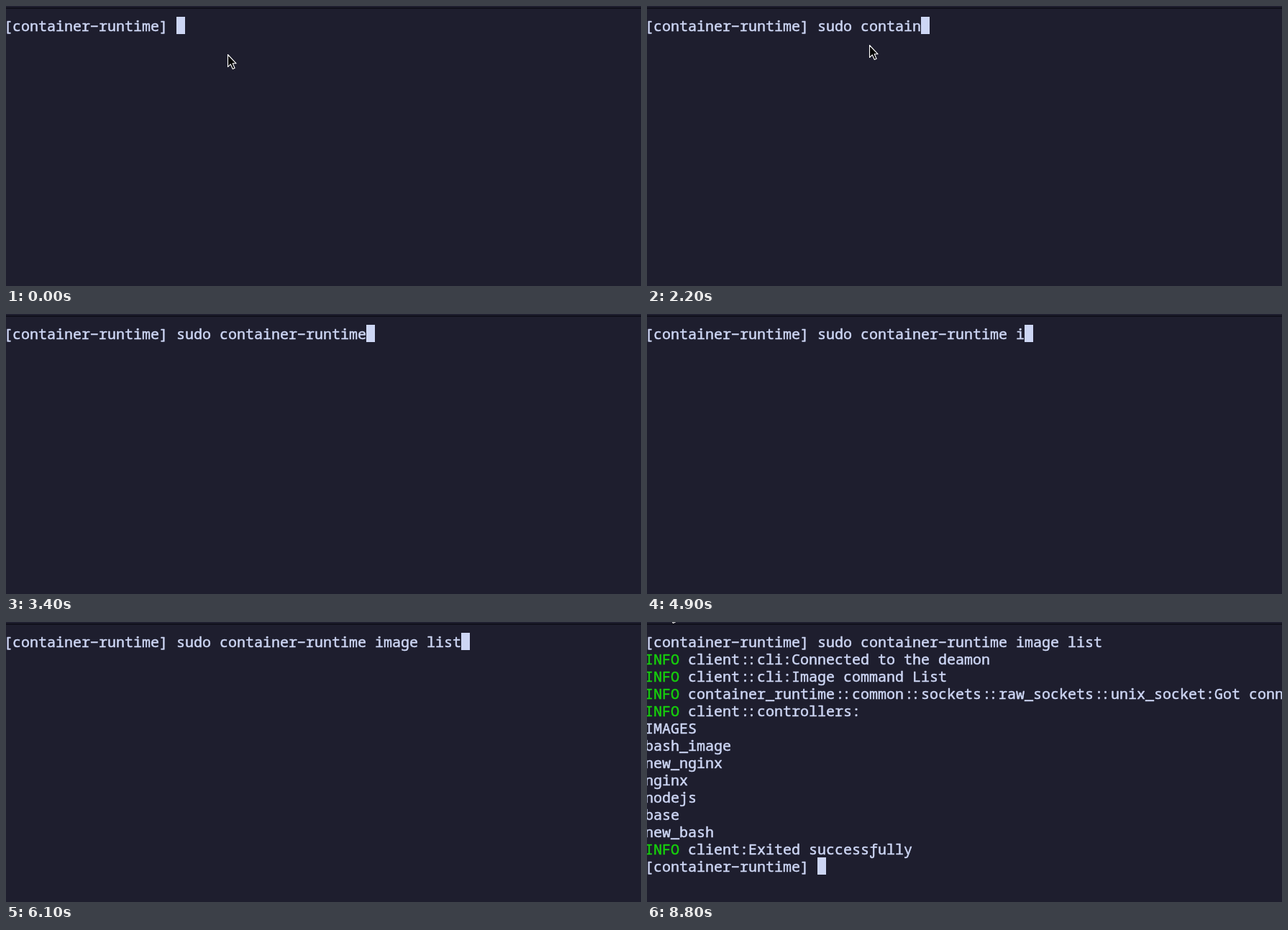
An HTML page with a canvas for the animation above (9000 ms loop, 883 by 389 pixels).

```html
<!DOCTYPE html>
<html lang="en">
<head>
<meta charset="utf-8">
<title>Terminal session</title>
<style>
  html, body { margin: 0; width: 100%; height: 100%; overflow: hidden; background: #1e1e2e; }
  canvas { display: block; }
</style>
</head>
<body>
<canvas id="stage" width="883" height="389"></canvas>
<script>
const LOOP = 9000, TICK = 100, KEY_PACE = 70;
const CELL = 12, ROW = 24, LEFT = -3, TOP = 15, BASELINE = 20;
const BG = '#1e1e2e', EDGE = '#11111b', TEXT = '#cdd6f4', GREEN = '#16d00c';

const PROMPT = '[container-runtime] ';
const OUTPUT_AT = 6800;
const OUTPUT = [
  'INFO client::cli:Connected to the deamon',
  'INFO client::cli:Image command List',
  'INFO container_runtime::common::sockets::raw_sockets::unix_socket:Got connection',
  'INFO client::controllers:',
  'IMAGES',
  'bash_image',
  'new_nginx',
  'nginx',
  'nodejs',
  'base',
  'new_bash',
  'INFO client:Exited successfully'
];

// Keystroke bursts: text, start, optional ms per key
const BURSTS = [
  ['su', 900], ['do', 1200], [' ', 1400],
  ['c', 1600], ['onta', 1800], ['iner', 2200], ['-', 2600],
  ['runt', 2800, TICK], ['ime', 3300], [' ', 3600],
  ['ima', 4900, TICK], ['ge', 5300], [' ', 5600], ['list', 5900]
];

// Pointer movements, each visible until its hide time
const GLIDES = [
  { start: 0, span: 300, hide: 3400, from: [308.5, 67.5], to: [309.5, 54.5] },
  { start: 8400, span: 400, hide: LOOP, from: [220.5, 39.5], to: [29.5, -18.5] }
];

// Drawn forms that mimic the terminal face: wide hyphen, descending f
const GLYPHS = { '-': '\u2212', 'f': '\u0192' };
const ARROW = new Path2D('M0 0V17L3.8 13.4L6.8 20L9.6 18.8L6.7 12.3H11.6Z');

const ctx = document.getElementById('stage').getContext('2d');
const snap = t => Math.floor(t / TICK) * TICK;

function typedAt(t) {
  return BURSTS.map(([text, start, pace = KEY_PACE]) =>
    [...text].filter((_, i) => start + snap(i * pace) <= t).join('')
  ).join('');
}

// Double colons sit closer together than the grid
function nudge(text, i) {
  if (text[i] !== ':') return 0;
  if (text[i + 1] === ':') return 1.5;
  return text[i - 1] === ':' ? -1.5 : 0;
}

function drawLine(text, row) {
  const tagged = text.startsWith('INFO');
  const y = TOP + row * ROW + BASELINE;
  [...text].forEach((ch, i) => {
    const glyph = GLYPHS[ch] || ch;
    const x = LEFT + i * CELL + nudge(text, i);
    ctx.fillStyle = ctx.strokeStyle = tagged && i < 4 ? GREEN : TEXT;
    ctx.fillText(glyph, x, y);
    ctx.strokeText(glyph, x, y);
  });
}

function drawCaret(col, row) {
  ctx.fillStyle = TEXT;
  ctx.fillRect(LEFT + col * CELL, TOP + row * ROW, CELL, ROW);
}

function drawPointer(t) {
  const glide = GLIDES.find(g => t >= g.start && t < g.hide);
  if (!glide) return;
  const p = Math.min(1, (t - glide.start) / glide.span);
  const ease = p * p * (3 - 2 * p);
  const [x, y] = glide.from.map((a, i) => a + (glide.to[i] - a) * ease);
  ctx.save();
  ctx.translate(x, y);
  ctx.fillStyle = '#000';
  ctx.fill(ARROW);
  ctx.strokeStyle = '#fff';
  ctx.lineWidth = 1.1;
  ctx.stroke(ARROW);
  ctx.restore();
}

function draw(t) {
  ctx.fillStyle = BG;
  ctx.fillRect(0, 0, 883, 389);
  ctx.fillStyle = EDGE;
  ctx.fillRect(0, 2, 883, 2);

  // A thin outline gives the text its medium weight
  ctx.font = '20px "Noto Sans Mono", "DejaVu Sans Mono", monospace';
  ctx.lineWidth = 0.5;
  ctx.lineJoin = 'round';

  const lines = [PROMPT + typedAt(t)];
  if (t >= OUTPUT_AT) lines.push(...OUTPUT, PROMPT);
  lines.forEach(drawLine);
  drawCaret(lines[lines.length - 1].length, lines.length - 1);
  drawPointer(t);
}

const start = performance.now();
function tick() {
  draw(snap((performance.now() - start) % LOOP));
  requestAnimationFrame(tick);
}
tick();
</script>
</body>
</html>
```
